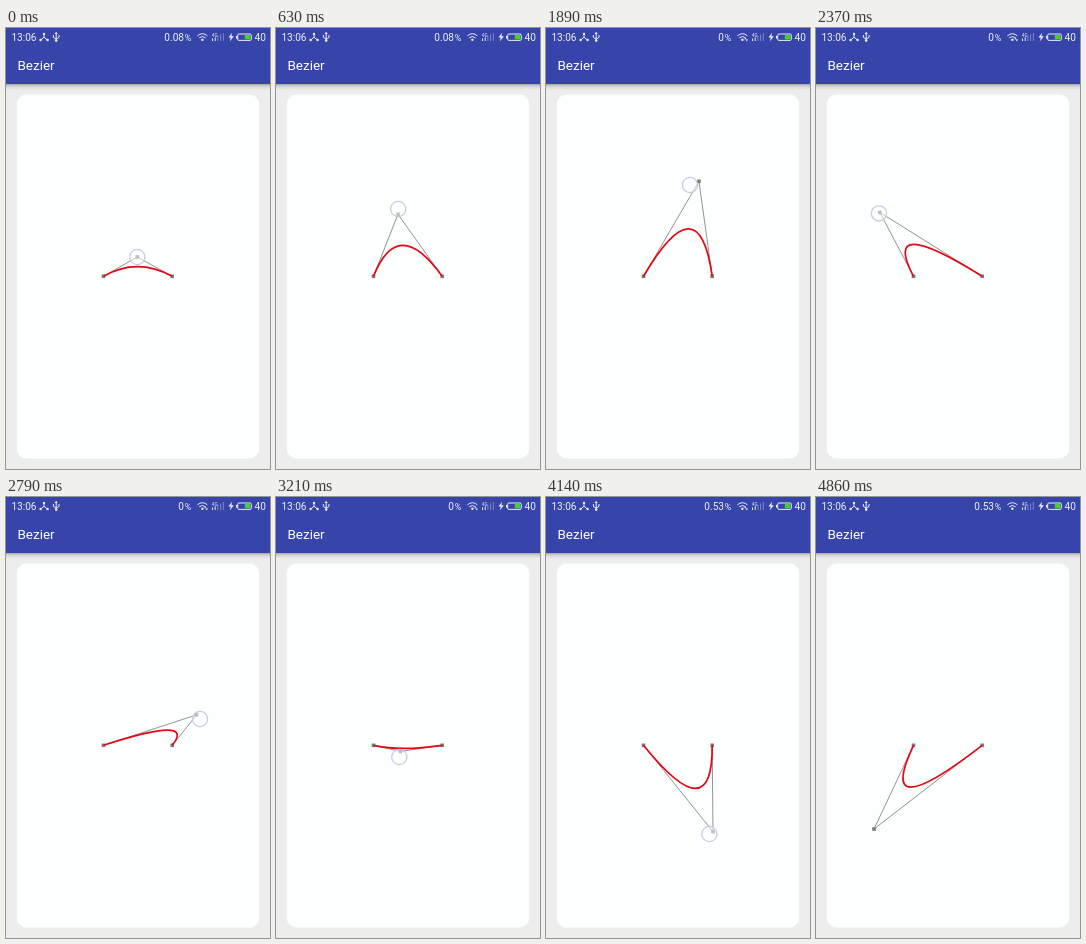
These frames come from a looping animation (264 by 441 pixels, 5160 ms). An HTML page:

```html
<!DOCTYPE html>
<html lang="en">
<head>
<meta charset="utf-8">
<title>Bezier</title>
<style>
  html, body { margin: 0; height: 100%; overflow: hidden; background: #ededee; }
  svg { display: block; width: 100vw; height: 100vh; }
  text { font-family: Roboto, sans-serif; fill: #fff; }
  .status { font-size: 10.1px; fill: #eef0fb; }
  .line { fill: none; stroke: #e9ebf8; stroke-width: 1; }
  .solid { fill: #e9ebf8; }
</style>
</head>
<body>
<svg viewBox="0 0 264 441">
  <defs>
    <linearGradient id="shade" x2="0" y2="1">
      <stop offset="0" stop-color="#000" stop-opacity=".3"/>
      <stop offset=".4" stop-color="#000" stop-opacity=".1"/>
      <stop offset="1" stop-color="#000" stop-opacity="0"/>
    </linearGradient>
  </defs>
  <rect width="264" height="441" fill="#ededee"/>
  <rect y="56" width="264" height="6" fill="url(#shade)"/>
  <rect width="264" height="56" fill="#3744aa"/>
  <rect x="10.8" y="66.6" width="242.4" height="363.8" rx="9.5" fill="#fdfefe"/>
  <text x="11.4" y="42.3" font-size="13.5">Bezier</text>

  <g id="statusBar">
    <text class="status" x="5.4" y="12.7">13:06</text>
    <path class="line" d="M38 5.5V9.2L34.6 12.2M38 9.2L41.6 12.2"/>
    <g class="solid">
      <circle cx="38" cy="5.9" r="1.2"/><circle cx="34.6" cy="12" r="1.2"/><circle cx="41.6" cy="12" r="1.2"/>
    </g>
    <path class="line" d="M50.2 5V13M47.4 7V9.4L50.2 11.2L53 9.4V7"/>
    <path class="solid" d="M48.6 6L50.2 3.8L51.8 6Z"/>
    <circle class="solid" cx="50.2" cy="12.6" r="1.3"/>

    <text id="rate" class="status" x="178" y="12.7" text-anchor="end">0.08</text>
    <text class="status" x="178.8" y="12.5" style="font-size:9px">%</text>

    <path class="line" d="M191.4 7.8Q196.4 3.6 201.4 7.8M193.2 9.8Q196.4 7.2 199.6 9.8"/>
    <circle class="solid" cx="196.4" cy="11.8" r="1.2"/>
    <path id="traffic" class="solid" d="M198.2 11.2L199.4 9.4L200.6 11.2ZM199.6 11.6H202L200.8 13.4Z"/>

    <text class="status" x="205.8" y="8.8" style="font-size:4.6px">4G</text>
    <path class="line" d="M206.5 13V10.5M209.2 13V9.4"/>
    <path class="line" opacity=".4" d="M211.9 13V8M214.6 13V6.5M217.3 13V5"/>
    <path class="solid" d="M226 4.8L222.4 9.6H224.8L223.8 13.4L227.8 8.2H225.4Z"/>
    <rect class="line" x="231.7" y="6" width="13.6" height="6.4" rx="1.2"/>
    <rect class="solid" x="230" y="7.8" width="1.4" height="2.8"/>
    <rect x="238.8" y="7" width="5.6" height="4.4" fill="#45d02b"/>
    <text class="status" x="248.6" y="12.7">40</text>
  </g>

  <path id="arms" fill="none" stroke="#808080" stroke-width=".85"/>
  <g fill="#7d7d7d">
    <rect x="95.7" y="246.5" width="3.6" height="3.6"/>
    <rect x="164.4" y="246.5" width="3.6" height="3.6"/>
    <rect id="handle" x="-1.8" y="-1.8" width="3.6" height="3.6"/>
  </g>
  <path id="curve" fill="none" stroke="#e30613" stroke-width="1.7"/>
  <circle id="touch" r="7.6" fill="#fff" fill-opacity=".5" stroke="#c3c5e0" stroke-opacity=".9" stroke-width="1.3"/>
</svg>
<script>
const LOOP = 5160, STEP = 30, LAG = 40, RELEASE = 4770;
const A = '97.5 248.3', B = '166.2 248.3';

// time, x, y, and velocity in px per ms
const KEYS = [
  [0, 131.3, 229, 0, 0],
  [150, 131.3, 229, 0, 0],
  [600, 122, 185, 0, -.13],
  [900, 137, 146, .07, -.08],
  [1170, 160.2, 136, .07, 0],
  [1560, 190, 139, 0, .03],
  [1890, 144, 157, -.23, .1],
  [2370, 63, 185.4, 0, .02],
  [2790, 194, 222, 0, .1],
  [3210, 123.3, 260, .02, .15],
  [3720, 158, 333, .06, .03],
  [3980, 172, 331, 0, .02],
  [4140, 163.4, 337, -.1, .07],
  [4370, 115, 350, -.22, 0],
  [4700, 58, 332, 0, 0],
];

const el = id => document.getElementById(id);
const [arms, handle, curve, touch, rate, traffic] =
  ['arms', 'handle', 'curve', 'touch', 'rate', 'traffic'].map(el);

function hermite(p, q, vp, vq, u, span) {
  const w = 1 - u;
  return p * w * w * (1 + 2 * u) + q * u * u * (3 - 2 * u)
    + span * u * w * (vp * w - vq * u);
}

function finger(t) {
  const i = KEYS.findIndex(k => k[0] > t);
  if (i < 0) return KEYS[KEYS.length - 1].slice(1, 3);
  const a = KEYS[i - 1], b = KEYS[i], span = b[0] - a[0], u = (t - a[0]) / span;
  return [1, 2].map(n => hermite(a[n], b[n], a[n + 2], b[n + 2], u, span));
}

const place = (node, [x, y]) => node.setAttribute('transform', `translate(${x} ${y})`);

function draw(t) {
  const c = finger(Math.max(0, t - LAG));
  arms.setAttribute('d', `M${A}L${c.join(' ')}L${B}`);
  curve.setAttribute('d', `M${A}Q${c.join(' ')} ${B}`);
  place(handle, c);
  place(touch, finger(t));
  touch.style.display = t < RELEASE ? '' : 'none';
  rate.textContent = t < 1410 ? '0.08' : t < 4020 ? '0' : '0.53';
  traffic.style.display = t >= 1650 && t < 4590 ? '' : 'none';
}

const start = performance.now();
function tick() {
  const t = (performance.now() - start) % LOOP;
  draw(Math.min(4860, Math.floor(t / STEP) * STEP));
  requestAnimationFrame(tick);
}
tick();
</script>
</body>
</html>
```
